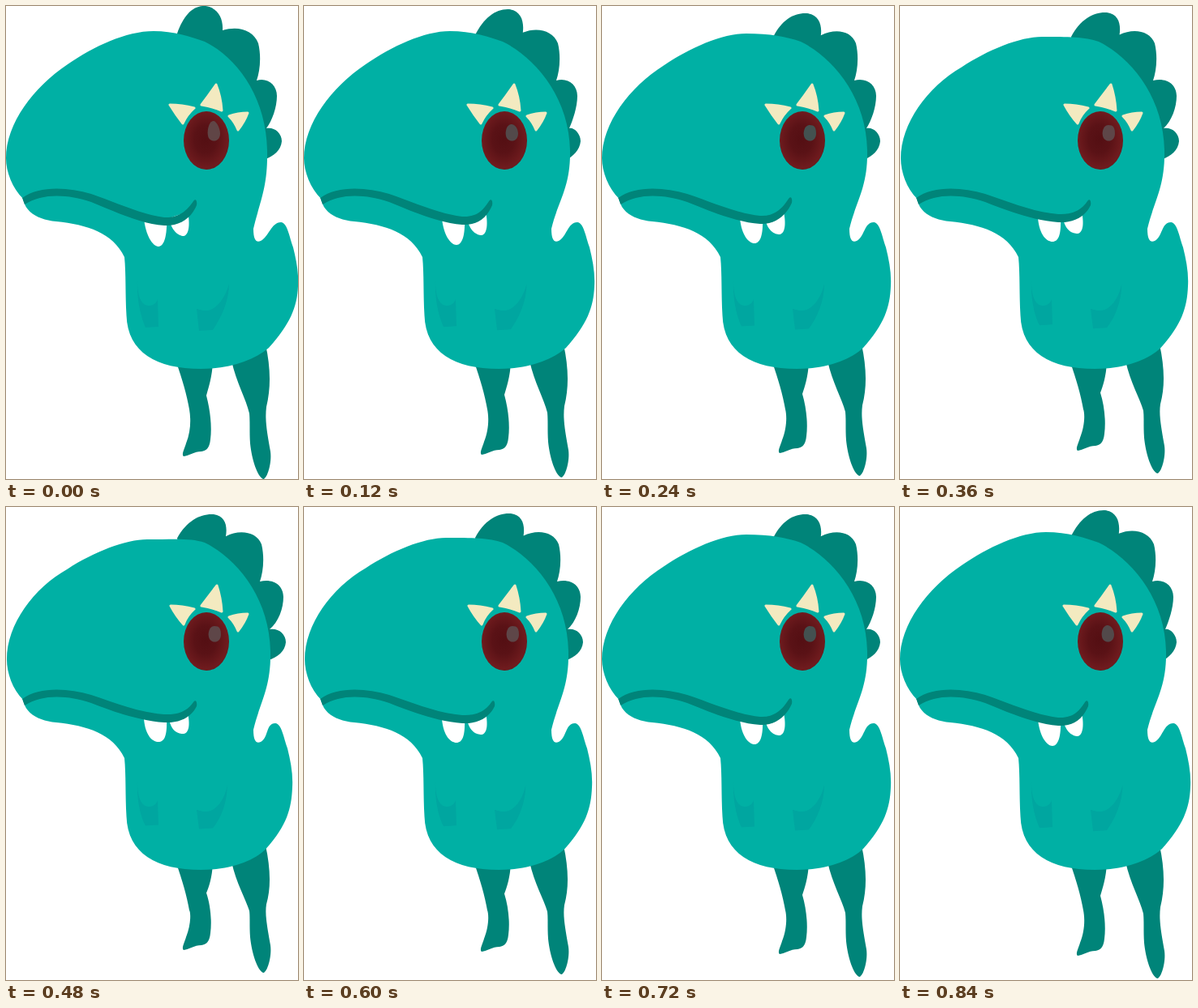
An HTML page that plays this animation: 360 px wide and 584 px high, repeating every 960 ms.

```html
<!DOCTYPE html>
<html lang="en">
<head>
<meta charset="utf-8">
<title>Little dinosaur</title>
<style>
html, body { margin: 0; width: 100%; height: 100%; overflow: hidden; background: #fff; }
svg { display: block; width: 100%; height: 100%; }
</style>
</head>
<body>
<svg viewBox="0 0 360 584" preserveAspectRatio="xMinYMin meet">
  <defs>
    <radialGradient id="iris" cx=".48" cy=".48" r=".54">
      <stop offset="0" stop-color="#540f13"/>
      <stop offset=".45" stop-color="#5a1216"/>
      <stop offset=".9" stop-color="#6f1b1e"/>
      <stop offset="1" stop-color="#681a1d"/>
    </radialGradient>
  </defs>
  <g fill="#008479">
    <path id="crest"/>
    <path id="legs"/>
  </g>
  <path id="body" fill="#00b0a4"/>
  <path id="arms" fill="#00a6a0"/>
  <path id="teeth" fill="#fff"/>
  <path id="mouth" fill="#008479"/>
  <path id="lashes" fill="#f3eac0" stroke="#f3eac0" stroke-width="3" stroke-linejoin="round"/>
  <ellipse cx="247" cy="166" rx="28" ry="36" fill="url(#iris)"/>
  <path id="glint"/>
</svg>
<script>
const STEP = 120;
const ORDER = [0, 1, 2, 3, 4, 3, 2, 1];

// left, topX, top, back: head outline; bumps: right edges of the crest;
// sag: lift of the mouth's low point; the rest are offsets
const POSES = [
  { left: 0, topX: 182, top: 31, back: 322, tail: 0, foot: 0, crestX: 0, crestY: 0,
    bumps: [313, 334, 340], mouth: [0, 0], sag: 0, teeth: [0, 0], glint: '#604546' },
  { left: 0, topX: 180, top: 31, back: 328, tail: -2, foot: -2, crestX: 7, crestY: 4,
    bumps: [315, 337, 341], mouth: [-3, 0], sag: -1, teeth: [-2, -1], glint: '#52494a' },
  { left: 0, topX: 178, top: 34, back: 327, tail: -4, foot: -4, crestX: 7, crestY: 9,
    bumps: [315, 338, 343], mouth: [-1, -3], sag: -2, teeth: [-4, -2], glint: '#435150' },
  { left: 1, topX: 175, top: 38, back: 326, tail: -5, foot: -7, crestX: 9, crestY: 8,
    bumps: [316, 341, 344], mouth: [0, 0], sag: -4, teeth: [-6, -3], glint: '#5e4648' },
  { left: 1, topX: 174, top: 40, back: 326, tail: -7, foot: -9, crestX: 10, crestY: 9,
    bumps: [317, 342, 345], mouth: [0, 0], sag: -5, teeth: [-7, -4], glint: '#5e4648' }
];

const shapes = {
  crest({ crestX: x, crestY: y, bumps: [a, b, c], back }) {
    const e = back - 3;
    return `M211 ${34 + y * .5} C${219 + x * .4} ${12 + y * .5} ${230 + x} ${y - 1} ${246 + x} ${y}
      C${261 + x} ${y + 2} ${268 + x * .5} ${y + 15} ${267 + x * .4} ${30 + y * .7}
      C287 ${24 + y * .4} ${a - 8} 30 ${a - 2} 46 C${a + 2} 63 ${a} 80 ${a - 4} 92
      C${b - 12} 88 ${b} 97 ${b} 111 C${b} 125 ${b - 6} 142 ${back - 1} 151
      C${c - 10} 149 ${c} 156 ${c} 167 C${c - 1} 178 ${c - 10} 186 ${e} 189 L240 160Z`;
  },

  legs({ foot: f }) {
    return `M210 440 H255 C254 458 250 470 247 ${481 + f * .5}
      C252 ${500 + f} 254 ${520 + f} 252 ${535 + f} C251 ${546 + f} 247 ${549 + f} 241 ${550 + f}
      C232 ${550 + f} 226 ${555 + f} 219 ${556 + f} C216 ${554 + f} 220 ${547 + f} 222 ${540 + f}
      C228 ${525 + f} 228 ${510 + f} 226 498 C223 480 217 460 210 440Z
      M278 438 L320 418 C326 445 327 470 321 ${495 + f * .5}
      C319 ${512 + f} 322 ${527 + f} 326 ${550 + f} C328 ${564 + f} 322 ${584 + f} 317 ${584 + f}
      C310 ${581 + f} 303 ${560 + f} 301 ${540 + f} C300 ${525 + f} 301 ${515 + f} 300 ${503 + f * .5}
      C296 485 284 465 278 438Z`;
  },

  body({ left: l, topX, top, back: b, tail: t }) {
    const drop = top - 31;
    return `M${l} 188 C${l} 145 34 100 76 ${72 + drop * .5}
      C108 ${50 + drop * .6} 148 ${top} ${topX} ${top} C207 ${top} 228 38 245 44
      C284 63 ${b - 1} 112 ${b} 178 C${b + 1} 224 313 241 305 275 C305 290 309 292 314 290
      C324 285 ${327 + t} 267 ${339 + t} 267 C${347 + t} 268 ${349 + t} 284 ${354 + t} 298
      C${358 + t} 314 ${361 + t} 330 ${360 + t} 346 C${359 + t} 372 ${350 + t * .5} 393 ${324 + t * .5} 422
      C305 438 275 448 240 448 C186 448 150 428 148.5 382 C147 355 148 330 146 310
      C132 280 100 270 62 266 C40 264 24 255 21 238 C8 225 ${l} 205 ${l} 188Z`;
  },

  arms({ foot: f }) {
    const d = f * .4, r = 275 + f * .25;
    return `M162 340 C162 356 166 370 176 370 C183 370 186 365 187 362 L188 ${396 + d} L172 ${397 + d}
      C167 385 161 365 162 340Z
      M${r} 343 C270 362 258 376 247 376 C240 376 237 374 235 374 L238 ${401 + d} L255 ${400 + d}
      C265 385 ${r} 365 ${r} 343Z`;
  },

  teeth({ teeth: [a, b] }) {
    return `M170 262 C172 283 181 ${297 + a} 188 ${297 + a} C195 ${297 + a} 199 283 198 262Z
      M201 262 C204 278 213 ${284 + b} 219 ${284 + b} C226 ${283 + b} 227 268 224 254Z`;
  },

  mouth({ mouth: [x, y], sag: s }) {
    return `M20 237 C40 222 75 223 105 232 C135 242 165 ${257 + s * .6} 195 ${261 + s}
      C215 ${262 + s} ${225 + x} ${250 + y} ${231 + x} ${241 + y}
      C${234 + x} ${237 + y} ${236 + x} ${241 + y} ${235 + x} ${246 + y}
      C${228 + x} ${263 + y + s * .5} 213 ${272 + s} 195 ${271 + s}
      C165 ${269 + s} 130 252 105 242 C75 232 45 231 23 245Z`;
  },

  lashes({ left: x }) {
    return `M${202 + x} 122 Q217 122 232 126 Q223 134 ${218 + x} 145 Q210 135 ${202 + x} 122Z
      M${259 + x} 97 Q265 112 266 129 Q254 124 241 122 Q250 110 ${259 + x} 97Z
      M298 132 Q294 143 286 153 Q282 143 275 136 Q286 132 298 132Z`;
  },

  glint({ left, crestY }) {
    const x = 256 + left, y = 142 + Math.min(crestY, 5), w = crestY > 5 ? 6 : 3;
    return `M${x} ${y} C${x + w} ${y} ${x + 8} 150 ${x + 8} 158 C${x + 7} 169 ${x - 3} 168 ${x - 6} 163
      C${x - 9} 158 ${x - 7} ${y} ${x} ${y}Z`;
  }
};

const parts = Object.entries(shapes).map(([id, shape]) => [document.getElementById(id), shape]);
const glint = document.getElementById('glint');
let shown = -1;

function draw(pose) {
  for (const [el, shape] of parts) el.setAttribute('d', shape(pose));
  glint.setAttribute('fill', pose.glint);
}

function tick() {
  const i = ORDER[Math.floor(performance.now() / STEP) % ORDER.length];
  if (i !== shown) draw(POSES[shown = i]);
  requestAnimationFrame(tick);
}
tick();
</script>
</body>
</html>
```
